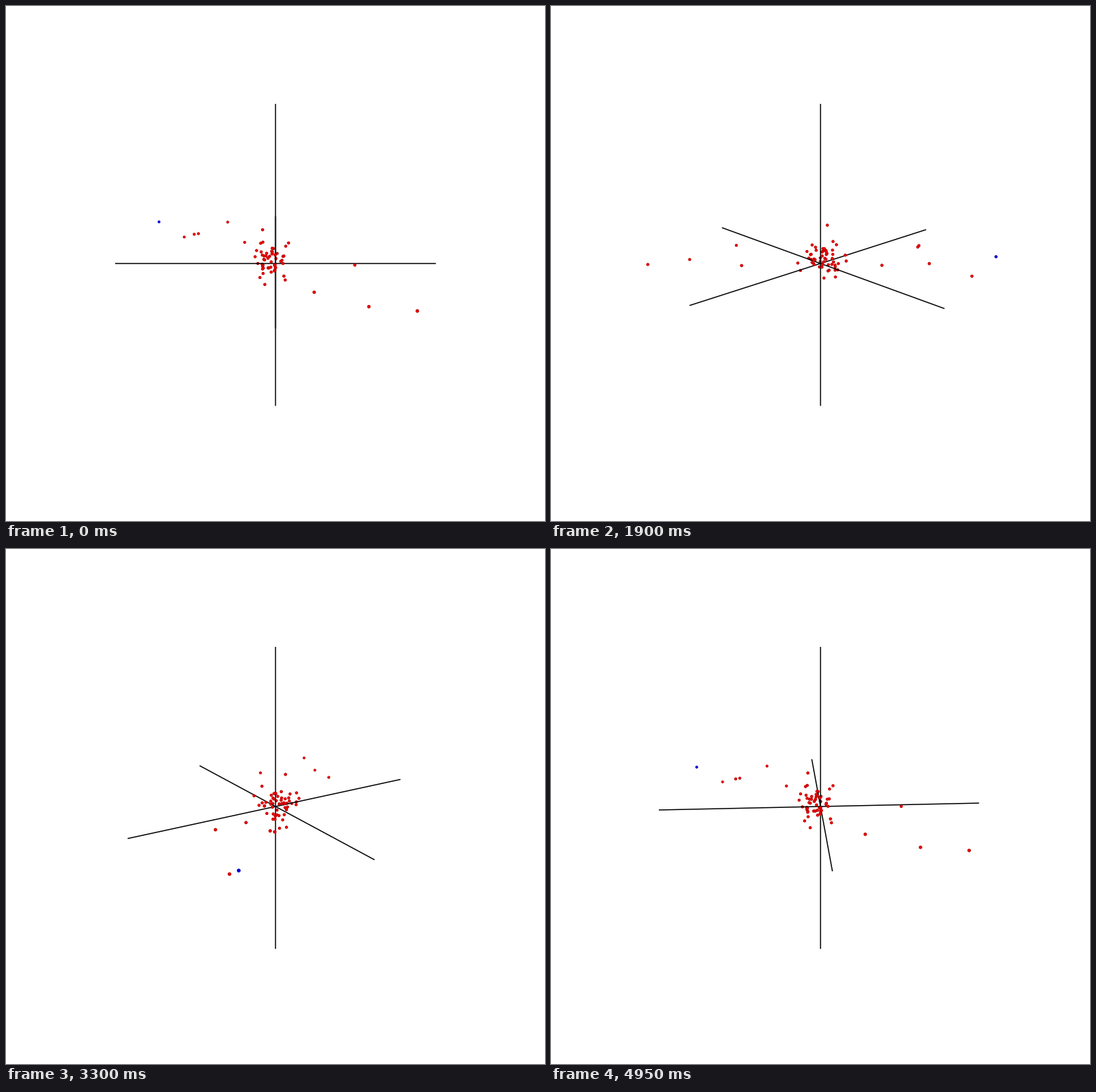
These frames come from a looping animation (765 px wide and 732 px high, 5000 ms). A matplotlib script:

```python
import numpy as np
import matplotlib.pyplot as plt
from matplotlib.animation import FuncAnimation

W, H, DPI = 765, 732, 100
FRAMES, INTERVAL = 100, 50
PT = 72 / DPI                                # points per pixel

# Perspective camera: 30 degree field of view, 20 degrees above the ground.
CENTER = np.array([W / 2, H / 2])
DISTANCE = 6.0
UNIT = H / 2 / np.tan(np.radians(15)) / DISTANCE   # pixels per unit at the origin
SIN_E, COS_E = np.sin(np.radians(20)), np.cos(np.radians(20))
DOT = 2.2                                    # dot radius in pixels at the origin
LINE = 1.5                                   # axis width in pixels

# Positions are (right, toward the viewer, up), in pixels at the origin.
BLUE = [(-184, -168, 9)]
FAR = [
    (-144, -158, -13), (-74, -138, 18), (-121, -78, 18), (-115, -81, 18),
    (-46, -76, 6), (-18, 5, 52), (109, 42, 13), (50, 128, 7),
    (119, 150, -4), (178, 169, -2),
]
CLUSTER_SIZE = 53


def make_cluster(count, seed=7):
    """Scatter points in a hollow ball, leaning along the line of far points."""
    rng = np.random.default_rng(seed)
    ways = rng.normal(size=(count, 3))
    ways /= np.linalg.norm(ways, axis=1, keepdims=True)
    radius = np.clip(rng.gamma(6, 4, count), 8, 46)
    cloud = ways * radius[:, None]
    cloud[:, 1] += 0.4 * cloud[:, 0]
    return cloud + (-1, 3, 7)


POINTS = np.vstack([BLUE, FAR, make_cluster(CLUSTER_SIZE)]) / UNIT
AXES = np.array([s * e for e in np.eye(3) for s in (-1, 1)])

# Rim and middle colour of each dot, like a small lit ball.
RED_BALL = [(0.70, 0, 0), (0.93, 0, 0)]
BLUE_BALL = [(0, 0, 0.70), (0, 0, 0.93)]
COLORS = np.array([BLUE_BALL] + [RED_BALL] * (len(POINTS) - 1))


def project(points, angle):
    """Turn points about the upright axis; return pixels, scale and nearness."""
    x, y, z = points.T
    c, s = np.cos(angle), np.sin(angle)
    right, toward = x * c - y * s, y * c + x * s
    near = toward * COS_E + z * SIN_E
    up = z * COS_E - toward * SIN_E
    scale = DISTANCE / (DISTANCE - near)
    offset = np.column_stack([right, -up]) * (scale * UNIT)[:, None]
    return CENTER + offset, scale, near


fig = plt.figure(figsize=(W / DPI, H / DPI), dpi=DPI, facecolor="white")
ax = fig.add_axes([0, 0, 1, 1])
ax.set_xlim(0, W)
ax.set_ylim(H, 0)
ax.axis("off")

lines = [ax.plot([], [], color="black", lw=LINE * PT, snap=False,
                 solid_capstyle="butt", zorder=2)[0] for _ in range(3)]
behind, front = [ax.scatter([], [], linewidths=0, snap=False, zorder=z)
                 for z in (1, 3)]


def place(dots, chosen, pos, scale):
    """Show the chosen points, each as a rim disc under a smaller middle disc."""
    diameter = 2 * DOT * PT * scale[chosen][:, None] * np.array([1, 0.72])
    dots.set_offsets(np.repeat(pos[chosen], 2, axis=0))
    dots.set_sizes(diameter.ravel() ** 2)
    dots.set_facecolors(COLORS[chosen].reshape(-1, 3))


def draw(i):
    angle = 2 * np.pi * i / FRAMES
    ends, _, _ = project(AXES, angle)
    for line, pair in zip(lines, ends.reshape(3, 2, 2)):
        line.set_data(pair[:, 0], pair[:, 1])
    pos, scale, near = project(POINTS, angle)
    order = np.argsort(near)
    place(behind, order[near[order] < 0], pos, scale)
    place(front, order[near[order] >= 0], pos, scale)
    return [*lines, behind, front]


anim = FuncAnimation(fig, draw, frames=FRAMES, interval=INTERVAL,
                     repeat=True, repeat_delay=0, blit=False)
plt.show()
```
